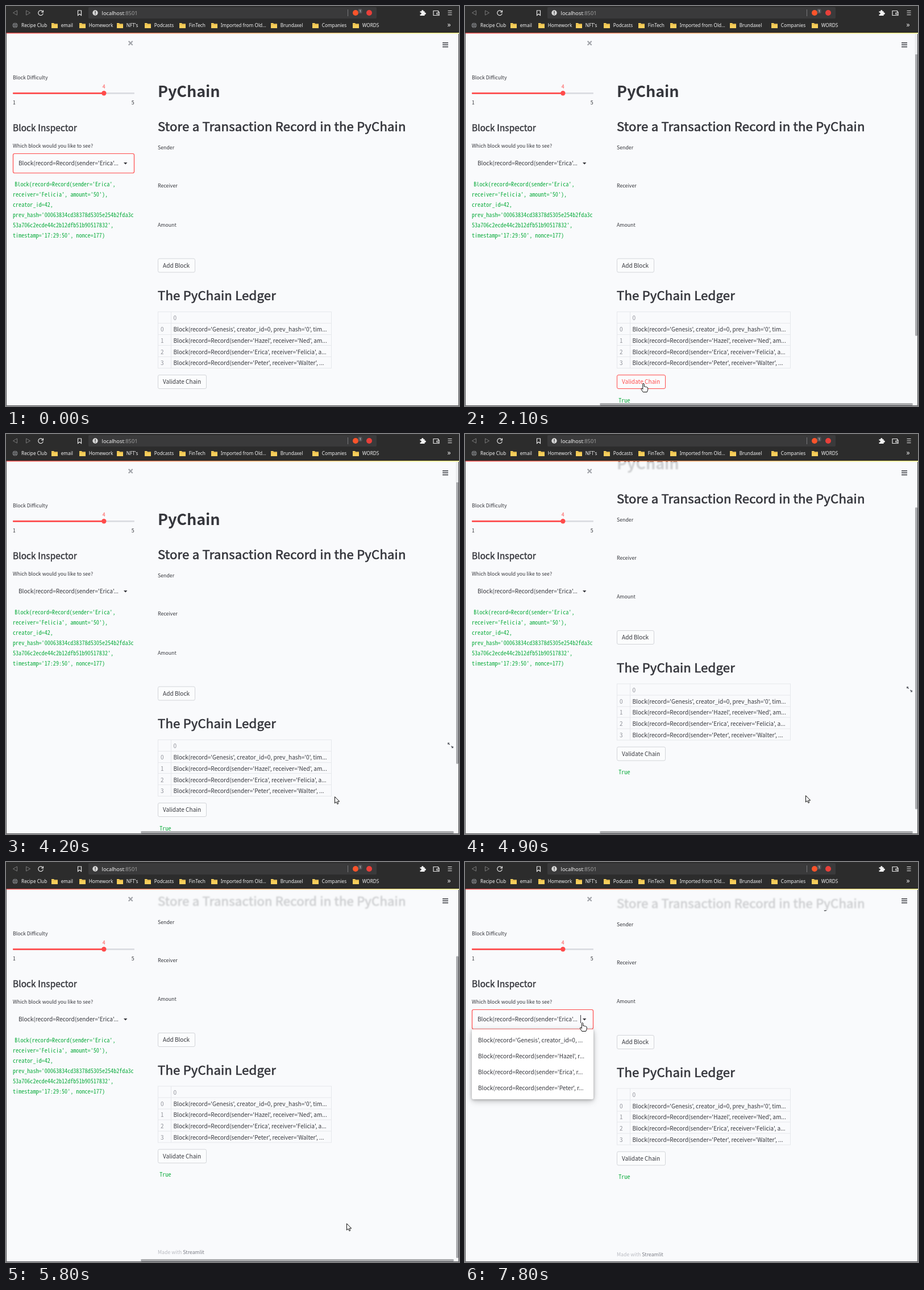
Animation, 797 px wide and 703 px high, one loop 8 s. Source, as an HTML page:

```html
<!DOCTYPE html>
<html lang="en">
<head>
<meta charset="utf-8">
<title>PyChain</title>
<style>
html, body { margin: 0; width: 100%; height: 100%; overflow: hidden; background: #f9fafc; }
svg, #header { position: absolute; left: 0; top: 0; }
svg { width: 797px; height: 703px; }
#header { left: 237px; top: 49px; width: 559px; height: 36px; background: rgba(249,250,252,.78); backdrop-filter: blur(1.3px); }
text { font: 10.08px "Noto Sans CJK JP", "Noto Sans CJK SC", "Noto Sans CJK", sans-serif; fill: #35363c; white-space: pre; }
text.label { font-size: 8.78px; }
text.h1 { font-size: 27.1px; font-weight: 700; letter-spacing: -.005em; }
text.h2, text.h3 { font-size: 22.1px; letter-spacing: .009em; stroke: #35363c; stroke-width: .65px; }
text.h3 { font-size: 15.3px; letter-spacing: .01em; stroke-width: .45px; }
text.code { font: 10.14px "Noto Sans Mono CJK JP", "Noto Sans Mono CJK SC", "Noto Sans Mono", monospace; font-size-adjust: ch-width .5; fill: #09ab3b; }
text.dim { fill: #8e9098; }
text.ui { font: 8.25px "Noto Sans", "Open Sans", sans-serif; fill: #f2f2f2; }
text.url { font-size: 9.3px; }
text.tip { font-size: 8.45px; fill: #4c4c4c; }
.icon { fill: none; stroke: #e6e6e6; stroke-width: 1.2; }
</style>
</head>
<body>
<svg id="page"></svg>
<div id="header"></div>
<svg id="front"></svg>
<script>
const $ = id => document.getElementById(id);
const text = (x, y, str, cls = '', extra = '') => `<text x="${x}" y="${y}" class="${cls}" ${extra}>${str}</text>`;
const rect = (x, y, w, h, fill, extra = '') => `<rect x="${x}" y="${y}" width="${w}" height="${h}" fill="${fill}" ${extra}/>`;
const path = (d, extra = 'class="icon"') => `<path d="${d}" ${extra}/>`;
const circle = (x, y, r, fill) => `<circle cx="${x}" cy="${y}" r="${r}" fill="${fill}"/>`;
const group = (id, body) => `<g id="${id}">${body}</g>`;

const RED = '#ff4b4b', INK = '#35363c', LINE = '#e6e8ec', EDGE = '#d3d5d9', THUMB = '#a8a9ac', OMNIBOX = '#3a3a3b';
const button = (y, w, label, id) => group(id,
  rect(267.5, y + .5, w, 24, '#fbfcfd', `rx="2.5" stroke="${EDGE}"`) + text(276, y + 16.2, label));

function table() {
  const rows = [
    "Block(record='Genesis', creator_id=0, prev_hash='0', tim...",
    "Block(record=Record(sender='Hazel', receiver='Ned', am...",
    "Block(record=Record(sender='Erica', receiver='Felicia', a...",
    "Block(record=Record(sender='Peter', receiver='Walter', ..."];
  let grid = 'M290.5 537.5V636.5M267.5 537.5V636.5M572.5 537.5V636.5';
  for (let i = 0; i < 6; i++) grid += `M267 ${Math.round(537 + i * 19.8) + .5}H573`;
  return path(grid, `fill="none" stroke="${LINE}"`) + text(294.5, 552.3, '0', 'dim') +
    rows.map((row, i) => text(272, 572 + i * 19.75, i, 'dim') + text(294.5, 572 + i * 19.75, row)).join('');
}

$('page').innerHTML = group('content',
  text(267, 160, 'PyChain', 'h1') +
  text(267, 220, 'Store a Transaction Record in the PyChain', 'h2') +
  text(267, 252, 'Sender', 'label') + text(267, 319.3, 'Receiver', 'label') + text(267, 387.5, 'Amount', 'label') +
  button(443.5, 65, 'Add Block', 'add') +
  text(267, 517, 'The PyChain Ledger', 'h2') + table() +
  button(648, 85, 'Validate Chain', 'validate') +
  text(270.3, 696.7, 'True', 'code', 'id="result"') +
  group('expand', path('M777 546V542.5H780.5L779.4 543.7L781.2 545.4L780 546.6L778.2 544.9Z' +
    'M787 548.5V552H783.5L784.6 550.8L782.8 549.1L784 547.9L785.8 549.6Z', 'fill="#5f6169"')) +
  text(267, 832, 'Made with <tspan fill="#7d7f87">Streamlit</tspan>', 'label', 'style="fill:#b9bbc1"')) +
  group('bars', rect(792, 49, 4, 531, THUMB, 'rx="2" id="thumb"') + rect(237, 698, 551, 4, THUMB, 'rx="2"'));

function toolbar() {
  const bookmarks = [[80, 'email'], [129, 'Homework'], [195, "NFT's"], [244, 'Podcasts'], [305, 'FinTech'],
    [361, 'Imported from Old...'], [466, 'Brundaxel'], [539, 'Companies'], [610, 'WORDS']];
  const folder = x => path(`M${x} 30h4l1.2 1.3h5.8v7.7h-11z`, 'fill="#f7cf5c"') + rect(x, 32.4, 11, .8, '#d9a93a');
  return rect(0, 0, 797, 47, '#2c2c2c') + rect(145, 2, 507, 20, OMNIBOX, 'rx="2"') +
    path('M19.5 8L12.5 12L19.5 16Z', 'fill="none" stroke="#777"') + path('M35.5 8L42.5 12L35.5 16Z', 'fill="none" stroke="#777"') +
    path('M64.6 9.7A4.3 4.3 0 1 0 65.3 13M65.5 7.5V10.8H62.2') +
    path('M126.5 8H132.5V16.5L129.5 14L126.5 16.5Z') +
    circle(157, 12, 4.7, '#d8d8d8') + rect(156.4, 9, 1.3, 3.8, OMNIBOX) + rect(156.4, 13.7, 1.3, 1.3, OMNIBOX) +
    text(168.5, 15.5, 'localhost<tspan fill="#a0a0a0">:8501</tspan>', 'ui url') +
    rect(601, 6, 1, 12, '#77777a') + circle(615, 12, 5, '#fb542b') +
    rect(619.5, 5, 7, 8, '#55565a', 'rx="2"') + text(621.4, 11.3, '1', 'ui', 'style="font-size:6px"') +
    circle(639, 12, 5, '#e8403a') +
    path('M728.5 9.3H731.2A1.7 1.7 0 1 1 734.4 9.3H736.6V11.6A1.7 1.7 0 1 1 736.6 14.8V17H728.5V14.5A1.6 1.6 0 1 0 728.5 11.6Z', 'fill="#f2f2f2"') +
    path('M752 8.5H760.5V10.5H762V16.5H752ZM758 12H762V14.5H758Z') +
    path('M777.5 8.5H784.5M777.5 12H784.5M777.5 15.5H784.5') +
    circle(16, 34, 4.6, '#77797c') + path('M11.5 34H20.5M16 29.5Q12.5 34 16 38.5Q19.5 34 16 29.5', 'fill="none" stroke="#3a3a3a" stroke-width=".8"') +
    text(27, 37, 'Recipe Club', 'ui') +
    bookmarks.map(([x, name]) => folder(x) + text(x + 16.7, 37, name, 'ui')).join('') +
    text(776.5, 37.3, '»', 'ui', 'style="font-size:12px"') +
    rect(0, 47, 797, 1.4, 'url(#stripe)');
}

function sidebar() {
  const block = ["receiver='Felicia', amount='50'),", 'creator_id=42,',
    "prev_hash='00063834cd38378d5305e254b2fda3c", "53a706c2ecde44c2b12dfb51b90517832',", "timestamp='17:29:50', nonce=177)"];
  const options = ["Block(record='Genesis', creator_id=0, ...", "Block(record=Record(sender='Hazel', r...",
    "Block(record=Record(sender='Erica', r...", "Block(record=Record(sender='Peter', r..."];
  return path('M215.7 61.8L222.7 68.8M222.7 61.8L215.7 68.8', 'stroke="#a2a4aa" stroke-width="2.2"') +
    text(12, 128.8, 'Block Difficulty', 'label') +
    rect(12, 152, 214, 2.8, '#dadce1', 'rx="1"') + rect(12, 152, 160, 2.8, RED, 'rx="1"') + circle(172.3, 153.3, 4.2, RED) +
    text(172.3, 145, '4', 'label', `text-anchor="middle" style="fill:${RED}"`) +
    text(12, 172.5, '1', 'label') + text(225.5, 172.5, '5', 'label', 'text-anchor="end"') +
    text(12, 219.5, 'Block Inspector', 'h3') + text(12, 248.8, 'Which block would you like to see?', 'label') +
    rect(12.5, 259.5, 213, 34, '#fafbfd', `id="focus" rx="2.5" stroke="${RED}" stroke-width="1.2"`) +
    text(22, 280, "Block(record=Record(sender='Erica'...") +
    path('M207 275H213.4L210.2 278.4Z', `fill="${INK}"`) +
    text(15.3, 317, "Block(record=Record(sender='Erica',", 'code') +
    block.map((line, i) => text(12, 335 + i * 18, line, 'code')).join('') +
    group('menu', rect(12, 293.7, 214, 123.3, '#fff', 'rx="3" style="filter:drop-shadow(0 3px 6px rgba(0,0,0,.2)) drop-shadow(0 1px 2px rgba(0,0,0,.25))"') +
      options.map((option, i) => text(23, 316.5 + i * 28.1, option)).join('') +
      rect(203, 269, 1, 14, INK));
}

const tooltip = rect(94, 583.5, 473.5, 55, '#fff', 'rx="2.5" stroke="#858585" style="filter:drop-shadow(1px 1px 1px rgba(0,0,0,.2))"') +
  ["Block(record=Record(sender='Hazel', receiver='Ned', amount='20000'), creator_id=42,",
    "prev_hash='ca79a7a65dcfdd15e112ba044ea813895aabd68d75625caba83c608ea0fcbb45',",
    "timestamp='17:28:35', nonce=238)"].map((line, i) => text(103, 598 + i * 15.9, line, 'ui tip')).join('');

const pointer = 'fill="#fff" stroke="#111" stroke-linejoin="round"';
$('front').innerHTML = `<defs><linearGradient id="stripe"><stop stop-color="${RED}"/><stop offset="1" stop-color="#fffd80"/></linearGradient></defs>` +
  toolbar() + sidebar() +
  path('M768 64.7H778M768 68.2H778M768 71.7H778', `stroke="${INK}" stroke-width="1.4"`) +
  path('M.5 47V702.5H796.5V49', 'fill="none" stroke="#47484c"') +
  group('tooltip', tooltip) +
  group('arrow', path('M.5 .5V12L3.2 9.5L5 13.5L6.8 12.7L5.1 8.9H8.7Z', pointer)) +
  group('hand', path('M-1.2 9V1.2Q0 -.8 1.2 1.2V6Q2.8 5 3.6 6.5Q5.2 5.7 5.9 7.2Q7.6 6.7 7.7 8.5V11.5L6.2 15.5H-.8L-4 10.6Q-4.2 8 -2.2 9.3L-1.2 10.5Z', pointer));

// time, x, y, shape
const cursorKeys = [
  [0, 0, 0, ''], [400, 168, 372, 'arrow'], [700, 245, 560, 'arrow'], [1000, 308, 655, 'arrow'], [1100, 314, 663, 'hand'],
  [2200, 314, 663, 'hand'], [2300, 345, 655, 'arrow'], [2700, 560, 580, 'arrow'], [2800, 565, 584, 'arrow'],
  [3100, 565, 584, 'arrow'], [3700, 578, 637, 'arrow'], [4200, 578, 637, 'arrow'], [4500, 599, 635, 'arrow'],
  [6100, 599, 635, 'arrow'], [6900, 179, 320, 'arrow'], [7000, 204, 294, 'arrow'], [7200, 204, 294, ''],
  [7800, 206.5, 282, 'hand'], [8000, 206.5, 282, 'hand']];
const scrollKeys = [[0, 0], [4700, 22], [4800, 62], [4900, 98.5], [5000, 116], [5100, 129], [5200, 138], [5300, 143.5], [6000, 139.5]];
const expandKeys = [[0, 0], [4200, 1], [5500, .7], [5700, .35], [5800, 0]];
const barKeys = [[0, 0], [500, 1], [2800, 0], [3200, 1], [6000, 0], [6200, 1], [6800, 0]];
const menuKeys = [[0, 0], [7500, .5], [7600, 1]];

const at = (keys, t) => keys.findLast(key => key[0] <= t);
const value = (keys, t) => at(keys, t)[1];
const fade = (id, opacity) => $(id).style.opacity = +opacity;

function placeCursor(t) {
  const from = at(cursorKeys, t), to = cursorKeys[cursorKeys.indexOf(from) + 1];
  const k = to[3] ? (t - from[0]) / (to[0] - from[0]) : 0;
  const spot = `translate(${from[1] + (to[1] - from[1]) * k},${from[2] + (to[2] - from[2]) * k})`;
  for (const shape of ['arrow', 'hand']) {
    $(shape).setAttribute('transform', spot);
    fade(shape, from[3] === shape);
  }
}

const [frame, caption] = $('validate').children;
function draw(now) {
  const t = Math.floor(now % 8000 / 100) * 100;
  const scroll = value(scrollKeys, t), done = t >= 2000, hover = t >= 1000 && t < 2300;
  $('content').setAttribute('transform', `translate(0,${-scroll})`);
  $('thumb').setAttribute('y', 49 + scroll * .81);
  $('thumb').setAttribute('height', done ? 531 : 552);
  frame.setAttribute('stroke', hover ? RED : EDGE);
  caption.style.fill = hover ? RED : '';
  fade('bars', value(barKeys, t));
  fade('expand', value(expandKeys, t));
  fade('menu', value(menuKeys, t));
  fade('result', done);
  fade('focus', t < 1800 || t >= 7500);
  fade('tooltip', t >= 2800 && t < 3200);
  placeCursor(t);
  requestAnimationFrame(() => draw(performance.now()));
}
draw(0);
</script>
</body>
</html>
```
